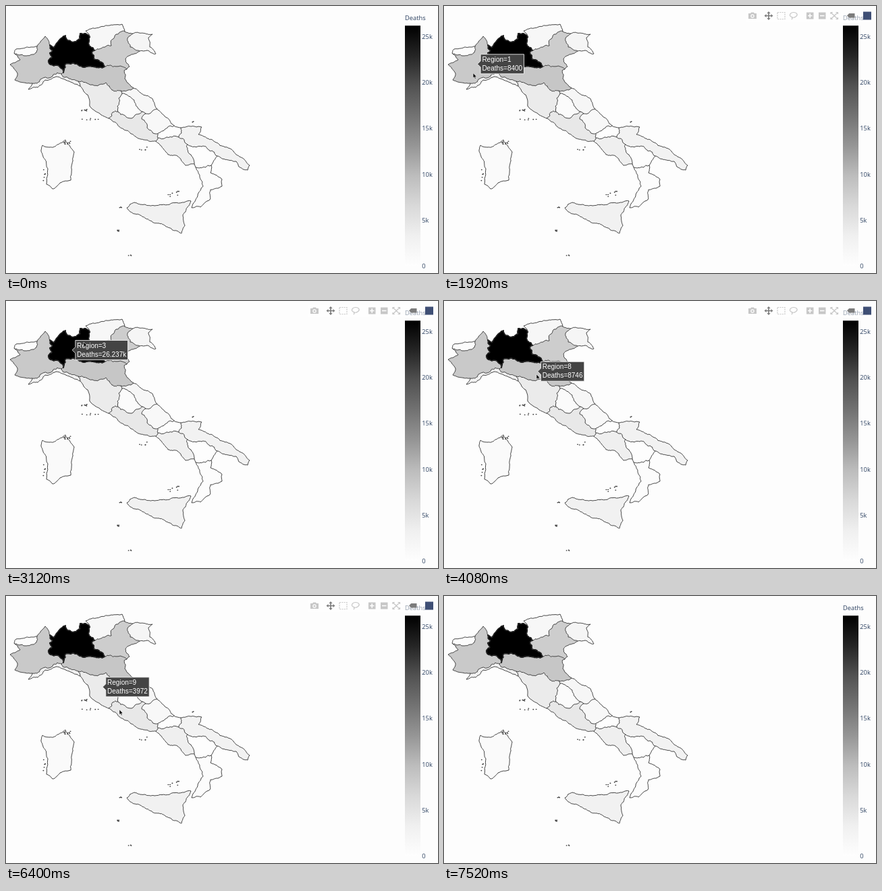
An HTML page that plays this animation: 640x397 px, repeating every 8.8 s.

```html
<!DOCTYPE html>
<html lang="en">
<head>
<meta charset="utf-8">
<title>Deaths by region</title>
<style>
  html, body { margin: 0; width: 100%; height: 100%; overflow: hidden; background: #fdfdfd; }
  svg { display: block; width: 100%; height: 100%; }
  .scale { font: 9.3px "Open Sans", sans-serif; fill: #2a3f5f; }
  .tip { font: 10px "Liberation Sans", Arial, sans-serif; fill: #fff; }
  .borders { fill: none; stroke: #3a3a3a; stroke-width: .95; stroke-linejoin: round; }
  .icon { fill: #c7c7c7; }
  .active { fill: #7c7c7c; }
  .line { fill: none; stroke: #c7c7c7; stroke-width: 1.2; }
</style>
</head>
<body>
<svg viewBox="0 0 640 397">
  <defs><linearGradient id="greys" x1="0" y1="1" x2="0" y2="0"></linearGradient></defs>
  <g id="map"></g>
  <rect x="591" y="29.2" width="23" height="357.8" fill="url(#greys)"/>
  <g id="scale" class="scale"><text x="591" y="21">Deaths</text></g>

  <g id="toolbar">
    <rect x="447" y="6" width="187" height="18" fill="#fff" opacity=".5"/>
    <path class="icon" fill-rule="evenodd" d="M451 11h3l1-1.6h4l1 1.6h3v8h-12zM457 12.2a2.8 2.8 0 1 0 .01 0zM457 13.5a1.5 1.5 0 1 1-.01 0z"/>
    <path class="active" d="M481 8l2.6 3h-1.8v2.7h2.7V12l3 2.5-3 2.6v-1.8h-2.7V18h1.8L481 21l-2.6-3h1.8v-2.7h-2.7v1.8l-3-2.6 3-2.5v1.7h2.7V11h-1.8z"/>
    <rect class="line" x="494" y="9.5" width="11" height="10" stroke-dasharray="2 1.3"/>
    <path class="line" d="M515 16.5c-5-2-2-7 3-7s7 4 3 6.5-6 0-6 0 2 1.5 0 4.2"/>
    <path class="icon" d="M537 9.5h10.5v10H537zM555 9.5h10.5v10H555z"/>
    <path stroke="#fff" stroke-width="1.6" d="M539 14.5h6.5M542.2 11.2v6.6M557 14.5h6.5"/>
    <path class="line" d="M573 12V9.5h2.8M580.5 9.5h3V12M583.5 17v2.5h-3M575.8 19.5H573V17M573.5 10l9.5 9M583 10l-9.5 9"/>
    <path class="active" d="M597 14.3l3.2-3.3h8.3v6.6h-8.3z"/>
    <rect x="621" y="8.5" width="12" height="12" fill="#3f4f75"/>
  </g>

  <g id="tip" class="tip">
    <path id="tipBox" fill="#444" stroke="#fff" stroke-width=".8"/>
    <text id="tipRegion" x="6.9" y="-3.3"></text>
    <text id="tipDeaths" x="6.9" y="9.6"></text>
  </g>
  <path id="cursor" d="M0 0v7.3l1.7-1.5 1.2 2.7 1.2-.6-1.1-2.5h2.2z" fill="#000" stroke="#fff" stroke-width=".5"/>
</svg>

<script>
const $ = id => document.getElementById(id);
const MAX = 26237;

function add(parent, tag, attrs, text = '') {
  const node = document.createElementNS('http://www.w3.org/2000/svg', tag);
  for (const key in attrs) node.setAttribute(key, attrs[key]);
  node.textContent = text;
  return parent.appendChild(node);
}

let seed = 7;
const jitter = size => ((seed = seed * 16807 % 2147483647) / 2147483647 - .5) * size;

// Colour scale
const greys = [254, 240, 217, 189, 150, 115, 82, 37, 0];
const rgb = v => `rgb(${v},${v},${v})`;
function shade(deaths) {
  const p = deaths / MAX * 8, i = Math.min(7, Math.floor(p));
  return rgb(Math.round(greys[i] + (greys[i + 1] - greys[i]) * (p - i)));
}
greys.forEach((v, i) => add($('greys'), 'stop', { offset: i / 8, 'stop-color': rgb(v) }));
for (let k = 0; k <= 25; k += 5)
  add($('scale'), 'text', { x: 616.3, y: 390 - k * 13.64 }, k ? k + 'k' : '0');

// Points where borders meet
const joints = {
  A: '12,70', B: '46,60', C: '65,58', D: '85,99', E: '82,101', F: '39,115', G: '124,46',
  H: '131,66', I: '176,38', J: '188,41', K: '198,67', L: '146,90', M: '179,94', N: '107,112',
  O: '110,119', P: '170,126', Q: '189,122', R: '172,130', S: '166,157', T: '152,167',
  U: '202,157', V: '207,160', W: '224,153', X: '249,178', Y: '225,190', Z: '225,196',
  a: '222,201', b: '256,195', c: '259,181', d: '269,206', e: '279,235', f: '313,223',
  g: '281,240', h: '304,237',
};

// Borders between joints, each shared by its neighbours; short names are outer edges
const arcs = {
  Ao: 'A 15,64 B', AoPi: 'A 28,74 45,69 B',
  PiN: 'B 58,45 C', PiW: 'F 13,110 17,100 6,87 21,80 A',
  PiLo: 'C 69,66 65,70 68,77 63,83 80,91 D', PiEm: 'D E', PiLi: 'F 46,115 51,109 70,102 E',
  Li: 'F 33,124 47,121 58,110 74,105 94,112 O', LiEm: 'E 92,107 N', LiTo: 'N O',
  Lo: 'C 71,62 78,52 88,44 91,51 104,53 110,49 110,41 118,41 G',
  LoTr: 'G 122,56 H', LoVe: 'H 127,69 130,79 L', LoEm: 'D 87,88 105,86 119,90 L',
  Tr: 'G 118,37 140,31 172,27 I', TrVe: 'H 148,60 156,59 163,42 I',
  VeN: 'I J', VeFr: 'J 180,48 184,61 K', VeE: 'K 177,79 183,90 M', VeEm: 'L M',
  Fr: 'J 217,42 211,47 213,61 222,71 209,66 K',
  Em: 'M 175,96 176,108 Q', EmTo: 'N 128,117 148,114 157,125 P', EmMa: 'P Q',
  To: 'T 141,162 124,149 121,132 O', ToMa: 'P R', ToUm: 'R 167,137 165,149 S',
  UmMa: 'R 190,140 195,151 U', UmLa: 'S 186,167 U',
  Ma: 'Q 217,138 W', MaLa: 'U V', MaAb: 'V W',
  La: 'a 196,197 174,183 T', LaTo: 'S 158,158 T', LaAb: 'V 201,168 209,181 Y', LaMo: 'Y Z', LaCm: 'Z a',
  Ab: 'W 235,164 X', AbMo: 'Y 236,183 X',
  Mo: 'X c', MoCm: 'Z 246,195 b', MoPu: 'b 260,189 c',
  Cm: 'e 266,237 254,223 240,221 a', CmPu: 'b d', CmBa: 'd 272,220 e',
  Pu: 'c 290,180 285,191 337,216 361,237 358,244 345,239 341,231 f', PuBa: 'd 290,209 f',
  BaE: 'f h', BaW: 'g e', BaCa: 'g 295,240 h',
  Ca: 'h 303,248 320,258 320,268 303,273 302,288 288,299 275,300 284,282 292,268 g',
  Si: '274,290 262,311 265,326 260,338 236,327 190,309 179,300 190,292 220,297 264,292 274,290',
  Sa: '54,207 65,210 88,199 101,217 96,259 80,263 69,272 60,265 62,242 52,214 54,207',
};

// Each region: death count and the arcs of its outline, "-" for reversed ones
const regions = [
  [400, 'Ao -AoPi'],
  [8400, 'AoPi PiN PiLo PiEm -PiLi PiW'],
  [1600, 'Tr -TrVe -LoTr'],
  [8000, 'VeN VeFr VeE -VeEm -LoVe TrVe'],
  [2000, 'Fr -VeFr'],
  [3100, 'Li -LiTo -LiEm -PiLi'],
  [8746, 'LoEm VeEm Em -EmMa -EmTo -LiEm -PiEm'],
  [3972, 'EmTo ToMa ToUm LaTo To -LiTo'],
  [700, 'UmMa -UmLa -ToUm'],
  [1800, 'Ma -MaAb -MaLa -UmMa -ToMa EmMa'],
  [4437, 'UmLa MaLa LaAb LaMo LaCm La -LaTo'],
  [1300, 'Ab -AbMo -LaAb MaAb'],
  [230, 'AbMo Mo -MoPu -MoCm -LaMo'],
  [3400, 'MoCm CmPu CmBa Cm -LaCm'],
  [2900, 'Pu -PuBa -CmPu MoPu'],
  [290, 'PuBa BaE -BaCa BaW -CmBa'],
  [520, 'Ca BaCa'],
  [3000, 'Si'],
  [900, 'Sa'],
  [MAX, 'Lo LoTr LoVe -LoEm -PiLo'],
];

// Fractal line from p up to, but without, q
function crinkle(p, q, roughness) {
  const length = Math.hypot(q[0] - p[0], q[1] - p[1]);
  if (length < 3) return [p];
  const shift = jitter(Math.min(length, 12) * roughness);
  const middle = [
    (p[0] + q[0]) / 2 - (q[1] - p[1]) / length * shift,
    (p[1] + q[1]) / 2 + (q[0] - p[0]) / length * shift,
  ];
  return [...crinkle(p, middle, roughness), ...crinkle(middle, q, roughness)];
}

function trace(name) {
  const points = arcs[name].split(' ').map(p => (joints[p] || p).split(',').map(Number));
  const roughness = name.length > 3 ? .4 : .25;
  return points.flatMap((p, i) => points[i + 1] ? crinkle(p, points[i + 1], roughness) : [p]);
}

const path = points => 'M' + points.map(p => p.map(v => v.toFixed(1))).join('L');
for (const name in arcs) arcs[name] = trace(name);
for (const [deaths, names] of regions) {
  const outline = names.split(' ').flatMap(n => n[0] === '-' ? [...arcs[n.slice(1)]].reverse() : arcs[n]);
  add($('map'), 'path', {
    d: path(outline) + 'z', fill: shade(deaths),
    stroke: deaths === MAX ? '#000' : 'none', 'stroke-width': 2, 'stroke-linejoin': 'round',
  });
}
add($('map'), 'path', { class: 'borders', d: Object.values(arcs).map(path).join('') });

// Scattered islets: centre, spread, count
const islets = [
  [115, 155, 10, 3, 7], [122, 168, 30, 4, 6], [203, 212, 18, 5, 5], [252, 280, 24, 9, 8], [171, 299, 8, 2, 3],
  [182, 371, 8, 2, 3], [274, 173, 8, 3, 2], [57, 240, 4, 50, 5], [90, 203, 12, 6, 9], [166, 334, 3, 2, 4],
];
for (const [x, y, width, height, count] of islets)
  for (let i = 0; i < count; i++)
    add($('map'), 'ellipse', { cx: x + jitter(width), cy: y + jitter(height), rx: 1, ry: .8, fill: '#3a3a3a' });

// Pointer track: time, x, y
const track = [
  [1520, 5, 131], [2160, 66, 81], [2480, 66, 81], [3120, 115, 61], [3440, 119, 66], [4080, 137, 109],
  [4320, 137, 110], [4720, 138, 138], [5840, 138, 139], [6080, 132, 146], [6400, 168, 169],
  [6800, 172, 168], [6880, 125, 160], [7040, 12, 167], [7120, 0, 170],
];
// Hover labels: start, x, y, region, deaths; each lasts until the next
const tips = [
  [1760, 49.5, 86.3, 1, '8400'],
  [2640, 98.2, 73, 3, '26.237k'],
  [3840, 138.8, 104.7, 8, '8746'],
  [4480, 143.2, 135.3, 9, '3972'],
  [6480, 189.6, 176, 12, '4437'],
];

function show(node, visible) {
  node.style.display = visible ? '' : 'none';
  return visible;
}
const moveTo = (node, x, y) => node.setAttribute('transform', `translate(${x} ${y})`);

function render(t) {
  show($('toolbar'), t >= 1600 && t < 7520);

  if (show($('cursor'), t >= 1520 && t < 7120)) {
    const i = track.findIndex(key => key[0] > t);
    const [t0, x0, y0] = track[i - 1], [t1, x1, y1] = track[i];
    const p = (t - t0) / (t1 - t0);
    moveTo($('cursor'), x0 + (x1 - x0) * p, y0 + (y1 - y0) * p);
  }

  if (show($('tip'), t >= 1760 && t < 6880)) {
    const [, x, y, region, deaths] = tips.findLast(tip => tip[0] <= t);
    moveTo($('tip'), x, y);
    $('tipRegion').textContent = 'Region=' + region;
    $('tipDeaths').textContent = 'Deaths=' + deaths;
    const right = 9.2 + $('tipDeaths').getComputedTextLength();
    $('tipBox').setAttribute('d', `M0 0L4.6-4.6V-14.5H${right}V14.5H4.6V4.6z`);
  }
}

const STEP = 80, LOOP = 8800;
const start = performance.now();
function frame() {
  const t = (performance.now() - start) % LOOP;
  render(Math.floor(t / STEP) * STEP);
  requestAnimationFrame(frame);
}
frame();
</script>
</body>
</html>
```
